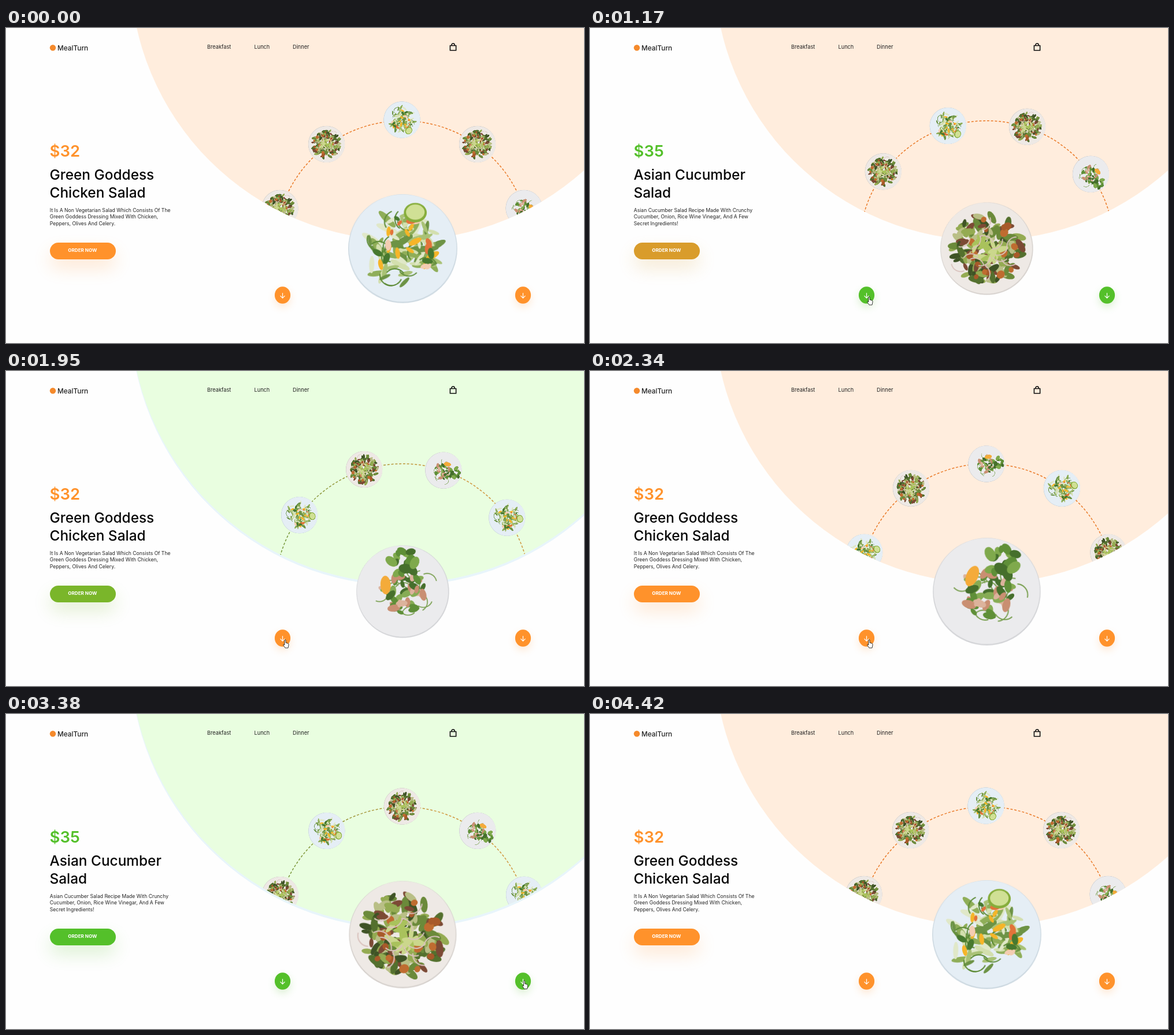
Animation, 1000 px wide and 546 px high, one loop 4.94 s. Source, as an HTML page with a canvas:

```html
<!DOCTYPE html>
<html lang="en">
<head>
<meta charset="utf-8">
<title>Salad menu</title>
<style>
html, body { margin: 0; width: 100%; height: 100%; overflow: hidden; background: #fefefe; }
canvas { display: block; }
</style>
</head>
<body>
<canvas id="stage" width="1000" height="546"></canvas>
<script>
const LOOP = 4940, TICK = 130, MOVE = 4 * TICK, RAD = Math.PI / 180;
const ctx = document.getElementById('stage').getContext('2d');

const orange = {
  accent: [255, 146, 43], back: '#ffeddd', dash: ['#ea7a28', '#ea7a28'], price: '$32',
  title: ['Green Goddess', 'Chicken Salad'],
  text: ['It Is A Non Vegetarian Salad Which Consists Of The',
    'Green Goddess Dressing Mixed With Chicken,', 'Peppers, Olives And Celery.']
};
const green = {
  accent: [84, 192, 42], back: '#e9fee0', dash: ['#72983a', '#d0963c'], price: '$35',
  title: ['Asian Cucumber', 'Salad'],
  text: ['Asian Cucumber Salad Recipe Made With Crunchy',
    'Cucumber, Onion, Rice Wine Vinegar, And A Few', 'Secret Ingredients!']
};
const themes = [orange, green, orange];
const mains = 'STP';
const wheel = 'TTTSTPSTP';   // one dish every 36 degrees, the fourth on top at first

const moves = [
  { start: -MOVE, from: 0, to: 0, lead: 0 },
  { start: 1170, from: 0, to: 1, lead: 0 },
  { start: 1950, from: 1, to: 2, lead: 0 },
  { start: 3250, from: 2, to: 1, lead: 245 },
  { start: 3900, from: 1, to: 0, lead: 0 }
];
// time, x, y of the pointer's tip
const pointer = [[390, 505, 546], [650, 487, 489], [910, 483, 466], [2470, 483, 466],
  [2730, 895, 462], [3900, 898, 463], [4290, 935, 548]];

const rgb = (c, a = 1) => `rgba(${c.map(Math.round)},${a})`;
const mix = (a, b, k) => a.map((v, i) => v + (b[i] - v) * k);

function disc(g, x, y, rx, ry, fill, turn = 0) {
  g.beginPath();
  g.ellipse(x, y, rx, ry, turn, 0, 7);
  g.fillStyle = fill;
  g.fill();
}

// ---- dishes, painted once on a unit plate ----
function makeDish(seed, plate, rim, paint) {
  const c = document.createElement('canvas');
  c.width = c.height = 200;
  const g = c.getContext('2d');
  g.translate(100, 100);
  g.scale(98, 98);
  const rnd = () => (seed = seed * 16807 % 2147483647) / 2147483647;
  const spot = reach => {
    const d = reach * Math.sqrt(rnd()), turn = 7 * rnd();
    return [d * Math.cos(turn), d * Math.sin(turn)];
  };
  const scatter = (n, reach, long, wide, colors, cx = 0, cy = 0) => {
    for (let i = 0; i < n; i++) {
      const [x, y] = spot(reach), k = .6 + .7 * rnd();
      disc(g, cx + x, cy + y, long * k, wide * k, colors[i % colors.length], 7 * rnd());
    }
  };
  const curls = (n, reach, color) => {
    g.strokeStyle = color;
    g.lineWidth = .022;
    for (let i = 0; i < n; i++) {
      const s = 7 * rnd();
      g.beginPath();
      g.arc(...spot(reach), .2, s, s + 1.8);
      g.stroke();
    }
  };
  disc(g, 0, 0, 1, 1, rim);
  disc(g, 0, -.01, .985, .985, plate);
  paint(scatter, curls, g);
  return c;
}

const dishes = {
  S: makeDish(110011, '#e5eef5', '#cdd9e1', (scatter, curls, g) => {
    scatter(75, .66, .17, .05, ['#8fae58', '#d3dfae', '#a9c276', '#e0e8c8', '#6d9345']);
    curls(16, .6, '#5e8c37');
    scatter(10, .68, .12, .05, ['#f6b528']);
    scatter(14, .6, .09, .05, ['#47792f', '#e2733a', '#f3cdb2']);
    disc(g, .23, -.66, .21, .18, '#86ad3b');
    disc(g, .23, -.67, .17, .14, '#d0e095');
  }),
  T: makeDish(290029, '#eee9e5', '#d6d1cd', (scatter, curls) => {
    scatter(150, .74, .13, .06, ['#6b8a3a', '#94ab52', '#3f5326', '#7c4a35', '#b9bf86', '#54702e']);
    scatter(22, .7, .08, .07, ['#bf6c30', '#a85a2a']);
    scatter(14, .26, .2, .06, ['#a9c25c', '#cbd78c']);
    curls(14, .64, '#d9c2bd');
  }),
  P: makeDish(470047, '#ebebed', '#d2d3d6', (scatter, curls, g) => {
    curls(14, .58, '#7da255');
    scatter(45, .46, .11, .06, ['#5f8f38', '#466f2c', '#c98f72', '#86ac54', '#dcb39c']);
    scatter(18, .28, .12, .08, ['#5f8f38', '#466f2c', '#7fa94c'], .3, -.55);
    disc(g, -.27, -.29, .11, .2, '#f4ab3a', .4);
  })
};

function dish(kind, x, y, r, deg) {
  const h = r * 100 / 98;
  ctx.save();
  ctx.translate(x, y);
  ctx.rotate(deg * RAD);
  ctx.drawImage(dishes[kind], -h, -h, 2 * h, 2 * h);
  ctx.restore();
}

// ---- page parts ----
function label(str, x, y, size, weight, fill) {
  ctx.font = `${weight} ${size}px Inter, sans-serif`;
  ctx.fillStyle = fill;
  ctx.fillText(str, x, y);
}

function shaded(color, alpha, blur, drop, draw) {
  ctx.save();
  ctx.shadowColor = rgb(color, alpha);
  ctx.shadowBlur = blur;
  ctx.shadowOffsetY = drop;
  draw();
  ctx.restore();
}

function stroke(path, color, width) {
  ctx.strokeStyle = color;
  ctx.lineWidth = width;
  ctx.stroke(new Path2D(path));
}

function header() {
  disc(ctx, 81, 34.3, 5.2, 5.2, '#f58a2c');
  label('MealTurn', 89, 39, 11.8, 500, '#222');
  label('Breakfast', 348, 36, 9.2, 400, '#222');
  label('Lunch', 429.5, 36, 9.2, 400, '#222');
  label('Dinner', 496, 36, 9.2, 400, '#222');
  stroke('M768.4 30.5H778.6V38.8H768.4ZM770.9 30V29.3A2.6 2.6 0 0 1 776.1 29.3V30', '#111', 1.6);
}

function copy(theme, button) {
  label(theme.price, 75.5, 222.5, 27.5, 600, rgb(theme.accent));
  theme.title.forEach((s, i) => label(s, 75.5, 262.5 + 31.5 * i, 24.4, 500, '#080808'));
  theme.text.forEach((s, i) => label(s, 75.8, 318.8 + 11.4 * i, 8.6, 400, '#222'));
  shaded(button, .2, 30, 15, () => {
    ctx.beginPath();
    ctx.roundRect(76, 372, 114, 29, 14.5);
    ctx.fillStyle = rgb(button);
    ctx.fill();
  });
  label('ORDER NOW', 107.3, 388.4, 8.1, 700, '#fff');
}

function arrowButton(x, color) {
  shaded(color, .2, 14, 6, () => disc(ctx, x, 463, 13.6, 14.8, rgb(color)));
  stroke(`M${x} 459.3V468M${x - 4} 464.2l4 4l4 -4`, '#fff', 1.2);
}

function backdrop(theme) {
  if (theme === green) disc(ctx, 685, -98, 470, 470, '#e8f5fb');
  disc(ctx, 685, -102, 470, 470, theme.back);
}

function carousel(step, theme) {
  const cx = 685 + step * .4, cy = 381 + step;
  ctx.save();
  ctx.beginPath();
  ctx.arc(685, -102, 470, 0, 7);
  ctx.clip();
  const dash = ctx.createLinearGradient(470, 0, 750, 0);
  theme.dash.forEach((color, i) => dash.addColorStop(i, color));
  ctx.strokeStyle = dash;
  ctx.lineWidth = 1.5;
  ctx.setLineDash([4, 2.8]);
  ctx.beginPath();
  ctx.arc(686.3, 381.3, 220.5, Math.PI, 2 * Math.PI);
  ctx.stroke();
  ctx.setLineDash([]);
  [...wheel].forEach((kind, i) => {
    const turn = (i - 3 - step) * 36 * RAD;
    dish(kind, cx + 222 * Math.sin(turn), cy - 222 * Math.cos(turn), 31.8, 129 - 36 * step);
  });
  ctx.restore();
}

const arrow = new Path2D('M0 0V10L2.3 7.9L3.9 11.4L5.4 10.8L3.9 7.4H6.9Z');
const hand = new Path2D('M-1.1 1A1.1 1.1 0 0 1 1.1 1V5L5 6.2Q6.2 6.8 6 9L5 14H0L-3 9.5Q-3.6 7.6 -2 8L-1.1 9Z');

function cursor(t) {
  const i = pointer.findIndex(k => k[0] > t);
  if (i < 1) return;
  const a = pointer[i - 1], b = pointer[i];
  const [, x, y] = mix(a, b, (t - a[0]) / (b[0] - a[0]));
  const over = y < 477 && [478.5, 894.5].some(c => Math.abs(x - c) < 14);
  const shape = over ? hand : arrow;
  ctx.save();
  ctx.translate(x, y);
  ctx.fillStyle = '#fff';
  ctx.strokeStyle = '#222';
  ctx.lineWidth = .9;
  ctx.fill(shape);
  ctx.stroke(shape);
  ctx.restore();
}

function draw(now) {
  const t = Math.floor(now % LOOP / TICK) * TICK;
  const { start, from, to, lead } = moves.findLast(m => m.start <= t);
  const left = Math.max(0, 1 - (t - start + lead) / MOVE);
  const swing = .52 * left ** 5;             // part of the turn still to go
  const step = to + (from - to) * swing;
  const theme = themes[to];
  const behind = themes[t - start < TICK ? from : to];   // the backdrop follows one tick later

  ctx.fillStyle = '#fefefe';
  ctx.fillRect(0, 0, 1000, 546);
  backdrop(behind);
  carousel(step, behind);
  dish(mains[to], 686.4, 382.4, 94.4 * (1 - .15 * left ** 1.8), -50 * swing);
  header();
  copy(theme, mix(theme.accent, themes[from].accent, .78 * left ** 8));
  arrowButton(478.5, theme.accent);
  arrowButton(894.5, theme.accent);
  cursor(t);
}

const begin = performance.now();
(function frame() {
  draw(performance.now() - begin);
  requestAnimationFrame(frame);
})();
</script>
</body>
</html>
```
